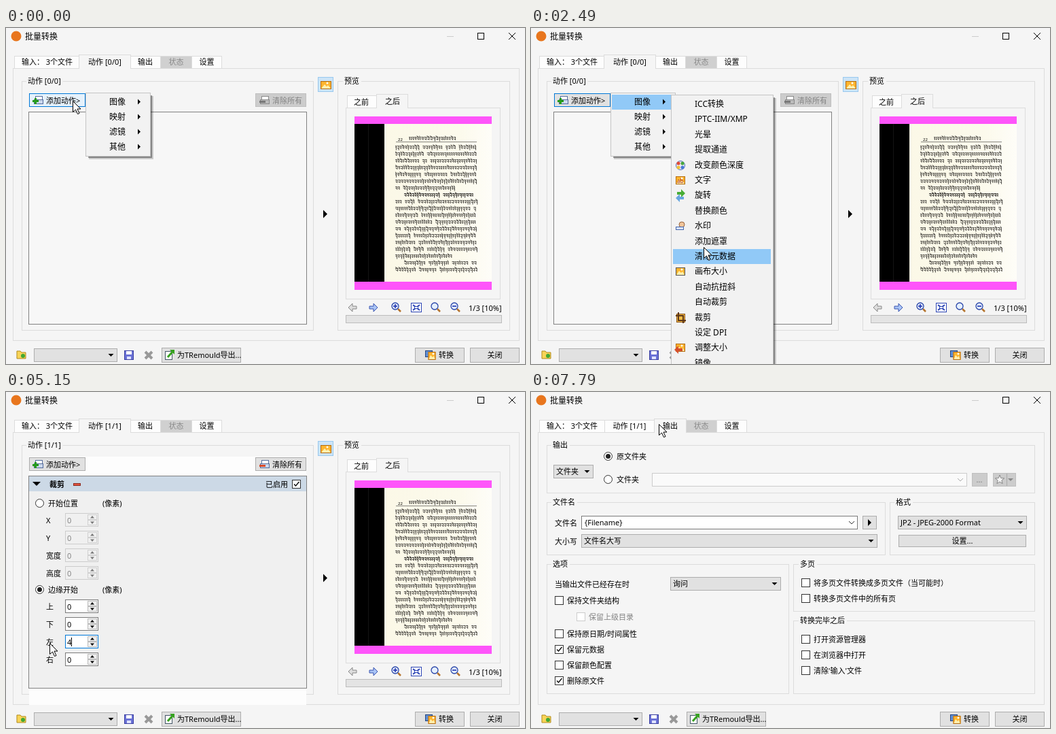
These frames come from a looping animation (764 by 494 pixels, 8 s). An HTML page with a canvas:

```html
<!DOCTYPE html>
<html lang="zh-CN">
<head>
<meta charset="utf-8">
<title>批量转换</title>
<style>
html, body { margin: 0; width: 100%; height: 100%; overflow: hidden; background: #f5f5f5; }
canvas { display: block; }
</style>
</head>
<body>
<canvas id="stage" width="764" height="494"></canvas>
<script>
const g = document.getElementById('stage').getContext('2d');
const LOOP = 8000, BG = '#f5f5f5', BLUE = '#0078d7', FACE = '#e1e1e1', EDGE = '#adadad';
const FONT = '"Noto Sans", "Noto Sans CJK SC", "Noto Sans CJK JP", sans-serif';

// Pointer stops: time, x, y
const STOPS = [
  [0, 98, 107], [1200, 135, 103], [1320, 152, 106], [1450, 174, 110], [1580, 188, 112],
  [1710, 200, 112], [1840, 232, 122], [1980, 264, 147], [2100, 263, 180], [2250, 260, 238],
  [2390, 254, 322], [2520, 247, 384], [2660, 243, 416], [2790, 241, 422], [3040, 241, 396],
  [3190, 232, 372], [3340, 216, 356], [3480, 192, 342], [3610, 166, 333], [3750, 140, 331],
  [3890, 122, 338], [4030, 110, 350], [4160, 104, 360], [4300, 100, 364], [4420, 92, 366],
  [4580, 76, 368], [4730, 64, 369], [6760, 72, 342], [6880, 90, 262], [7010, 122, 140],
  [7140, 160, 40], [7270, 183, 18], [7400, 188, 47]
];
const MENU = ['图像', '映射', '滤镜', '其他'];
const ITEMS = ['ICC转换', 'IPTC-IIM/XMP', '光晕', '提取通道', '改变颜色深度', '文字', '旋转', '替换颜色', '水印',
  '添加遮罩', '清除元数据', '画布大小', '自动抗扭斜', '自动裁剪', '裁剪', '设定 DPI', '调整大小', '镜像'];

function text(s, x, cy, { size = 11, color = '#000', align = 'left', bold = false } = {}) {
  g.font = (bold ? 'bold ' : '') + size + 'px ' + FONT;
  g.textAlign = align;
  g.fillStyle = color;
  g.fillText(s, x, cy + 4);
}
function fill(x, y, x2, y2, color) {
  g.fillStyle = color;
  g.fillRect(x, y, x2 - x, y2 - y);
}
function box(x, y, x2, y2, color, edge = EDGE) {
  if (color) fill(x, y, x2, y2, color);
  g.strokeStyle = edge;
  g.lineWidth = 1;
  g.strokeRect(x + .5, y + .5, x2 - x - 1, y2 - y - 1);
}
function line(pts, color = '#000', width = 1) {
  g.beginPath();
  for (let i = 0; i < pts.length; i += 2) g.lineTo(pts[i], pts[i + 1]);
  g.strokeStyle = color;
  g.lineWidth = width;
  g.stroke();
}
function poly(pts, color, edge) {
  g.beginPath();
  for (let i = 0; i < pts.length; i += 2) g.lineTo(pts[i], pts[i + 1]);
  g.closePath();
  g.fillStyle = color;
  g.fill();
  if (edge) { g.strokeStyle = edge; g.lineWidth = 1; g.stroke(); }
}
function disc(x, y, r, color, edge, width = 1) {
  g.beginPath();
  g.arc(x, y, r, 0, 7);
  if (color) { g.fillStyle = color; g.fill(); }
  if (edge) { g.strokeStyle = edge; g.lineWidth = width; g.stroke(); }
}
const right = (x, y, h = 4) => poly([x, y - h, x + h, y, x, y + h], '#000');
const down = (x, y, w = 4, color = '#000') => poly([x - w, y - w / 2, x + w, y - w / 2, x, y + w / 2], color);

function group(x, y, x2, y2, label, lx) {
  box(x, y, x2, y2, null, '#dcdcdc');
  g.font = '11px ' + FONT;
  fill(lx - 2, y - 1, lx + g.measureText(label).width + 3, y + 2, BG);
  text(label, lx, y);
}
function combo(x, y, x2, label) {
  box(x, y, x2, y + 20, FACE);
  text(label, x + 4, y + 10);
  down(x2 - 9.5, y + 10);
}
function check(x, cy, label, { on, off } = {}) {
  box(x, cy - 7, x + 13, cy + 6, '#fff', off ? '#ccc' : '#333');
  if (on) line([x + 3, cy - .5, x + 5.5, cy + 2, x + 10.5, cy - 4], '#000', 1.3);
  text(label, x + 18, cy, { color: off ? '#838383' : '#000' });
}
function radio(x, y, on) {
  disc(x, y, 6, '#fff', '#333');
  if (on) disc(x, y, 3.5, '#222');
}

// Small icons, each centred on x, y
function picture(x, y, w = 14) {
  box(x - w / 2, y - 6, x + w / 2, y + 6, '#ffb52e', '#b36b12');
  poly([x - w / 2 + 1, y + 5, x - 2, y - 1, x + 1, y + 2, x + 3, y, x + w / 2 - 1, y + 5], '#fff0b0');
  disc(x + 2, y - 3, 1.5, '#fff');
}
function printer(x, y, mark, grey) {
  box(x - 4, y - 7, x + 7, y - 1, '#fff', grey ? '#888' : '#536b9b');
  box(x - 6, y - 2, x + 8, y + 5, grey ? '#bbb' : '#cbd8ee', grey ? '#888' : '#536b9b');
  if (mark === '+') {
    fill(x - 8, y - 1, x + 1, y + 2, '#279c1a');
    fill(x - 5, y - 4, x - 2, y + 5, '#279c1a');
  } else fill(x - 7, y, x + 2, y + 3, grey ? '#777' : '#d84a28');
}
function arrowIcon(x, y, dir, color, edge) {
  poly([x - 6, y - 2, x, y - 2, x, y - 6, x + 6, y, x, y + 6, x, y + 2, x - 6, y + 2]
    .map((v, i) => i % 2 ? v : x + (v - x) * dir), color, edge);
}
function lens(x, y, sign) {
  line([x + 3, y + 3, x + 7, y + 7], '#b5742d', 2.5);
  disc(x - 1, y - 1, 5, '#e4efff', '#2945a8', 1.3);
  if (sign) line([x - 4, y - 1, x + 2, y - 1], '#2034b0', 1.6);
  if (sign === '+') line([x - 1, y - 4, x - 1, y + 2], '#2034b0', 1.6);
}
function fitIcon(x, y) {
  box(x - 8, y - 7, x + 8, y + 7, '#fff', '#2c45b5');
  line([x - 5, y - 4, x + 5, y + 4], '#2c45b5', 2);
  line([x + 5, y - 4, x - 5, y + 4], '#2c45b5', 2);
  box(x - 3, y - 2, x + 3, y + 2, '#fff', '#2c45b5');
}
function folder(x, y) {
  poly([x - 7, y - 5, x - 2, y - 5, x, y - 3, x + 6, y - 3, x + 6, y + 6, x - 7, y + 6], '#f8d458', '#b08a1d');
  disc(x + 2, y + 2, 3, '#42a833');
}

function tab(x, x2, label, state) {
  const on = state === 'on';
  const color = { on: BG, off: '#d0d0d0', hot: '#d8eafa' }[state] || '#fdfdfd';
  const y = on ? 39 : 41;
  box(x, y, x2, 60, color, '#dcdcdc');
  if (on) fill(x + 1, 58, x2 - 1, 61, BG);
  text(label, (x + x2) / 2, 50, { align: 'center', color: state === 'off' ? '#8a8a8a' : '#000' });
}
function frame(t) {
  fill(0, 0, 764, 494, BG);
  disc(15, 12, 7.5, '#e8761e');
  text('批量转换', 28, 13, { size: 12 });
  line([649, 12.5, 659, 12.5], '#ccc');
  box(694, 7, 704, 17, null, '#000');
  line([740, 7, 750, 17]);
  line([750, 7, 740, 17]);
  box(10, 59, 756, 460, BG, '#dcdcdc');
  const out = t >= 7670, count = t >= 2900 ? '1/1' : '0/0';
  tab(12, 109, '输入： 3个文件');
  tab(227, 274, '状态', 'off');
  tab(273, 318, '设置');
  if (out) {
    tab(108, 182, `动作 [${count}]`);
    tab(181, 229, '输出', 'on');
  } else {
    tab(182, 228, '输出', t >= 7400 && 'hot');
    tab(107, 184, `动作 [${count}]`, 'on');
  }
}
function footer() {
  folder(23, 480);
  combo(41, 471, 164, '');
  box(174, 474, 188, 488, '#6b72d6', '#3a3fa0');
  fill(177, 475, 185, 480, '#fff');
  fill(178, 483, 184, 487, '#dfe3ff');
  line([205, 476, 215, 486], '#999', 4);
  line([215, 476, 205, 486], '#999', 4);
  box(229, 470, 346, 492, FACE);
  box(234, 475, 245, 488, '#fff', '#456');
  line([238, 484, 246, 475], '#36a21f', 3);
  poly([241, 473, 248, 473, 248, 480], '#36a21f');
  text('为TRemould导出...', 252, 481);
  box(602, 470, 675, 492, FACE);
  box(617, 474, 628, 484, '#5e8ed6', '#27477f');
  picture(627, 482, 11);
  text('转换', 637, 481);
  box(683, 470, 756, 492, FACE);
  text('关闭', 719.5, 481, { align: 'center' });
}

// Scanned page of a headline-hung script, made of seeded strokes
function script(x, y, end, rnd, bold) {
  g.beginPath();
  while (x < end - 2) {
    const w = 1.8 + rnd() * 2, low = rnd() < .3 ? 3.6 : 1.8;
    g.moveTo(x, y - 2.5);
    g.lineTo(x + w, y - 2.5);
    g.moveTo(x + w - .4, y - 2.5);
    g.lineTo(x + w - .4, y + low);
    g.moveTo(x + .3, y - 1 + rnd());
    g.lineTo(x + w - .4, y + rnd() * 1.8);
    if (rnd() < .32) { g.moveTo(x, y - 4.3); g.lineTo(x + w * .8, y - 3.3); }
    x += w + (rnd() < .04 ? 5 : .7);
  }
  g.lineWidth = bold ? 1 : .8;
  g.stroke();
}
function scan(x, y, x2, y2) {
  const scale = (y2 - y) / 232;
  const paper = g.createLinearGradient(x, 0, x2, 0);
  paper.addColorStop(0, '#fbf8e7');
  paper.addColorStop(.7, '#fcfaec');
  paper.addColorStop(1, '#fefdf8');
  fill(x, y, x2, y2, paper);
  let seed = 22;
  const rnd = () => (seed = seed * 16807 % 2147483647) / 2147483647;
  g.save();
  g.translate(x, y);
  g.scale(scale, scale);
  text('22', 20, 21, { size: 6 });
  g.strokeStyle = '#2b2926';
  script(36, 22, 105, rnd);
  line([17, 26.5, 136, 26.5], '#555', .7);
  g.strokeStyle = '#2b2926';
  const ends = { 6: 106, 16: 101, 18: 137 };
  for (let i = 0; i < 19; i++) script(i === 7 || i === 17 ? 29 : 16, 35 + i * 10, ends[i] || 136, rnd, i === 7);
  g.restore();
}
function preview(t) {
  const cropped = t >= 6360;
  box(459, 72, 482, 94, '#cce4f7', '#99c9ef');
  picture(471, 84, 16);
  right(467, 273.5, 6);
  group(488, 78, 742, 445, '预览', 498);
  box(500, 117, 728, 399, BG, '#dcdcdc');
  box(502, 99, 546, 118, '#fdfdfd', '#dcdcdc');
  text('之前', 523, 109, { align: 'center' });
  box(545, 97, 592, 118, BG, '#dcdcdc');
  fill(546, 116, 591, 119, BG);
  text('之后', 569, 108, { align: 'center' });
  fill(513, 130, 715, 385, '#fe55fa');
  if (cropped) scan(528, 130, 700, 385);
  else {
    fill(513, 141, 557, 373, '#000');
    line([533.5, 141, 533.5, 373], '#141414');
    scan(557, 141, 715, 373);
  }
  arrowIcon(510, 411, -1, '#ddd', '#888');
  arrowIcon(541, 411, 1, '#a9c4f5', '#3a55b0');
  lens(574, 410, '+');
  fitIcon(604, 411);
  lens(632, 410);
  lens(661, 410, '-');
  text(`1/3 [${cropped ? 11 : 10}%]`, 681, 412);
  box(500, 422, 730, 434, '#e4e4e4', '#bcbcbc');
}

function spin(y, value, { off, focus, selected, caret } = {}) {
  box(87, y - 10, 136, y + 10, off ? '#f0f0f0' : '#fff', focus ? BLUE : off ? '#ccc' : '#7a7a7a');
  if (selected) fill(90, y - 6, 97, y + 7, BLUE);
  text(value, 90, y + 1, { color: selected ? '#fff' : off ? '#838383' : '#000' });
  if (caret) {
    const x = Math.round(90 + g.measureText(value).width);
    fill(x, y - 6, x + 1, y + 7, '#000');
  }
  for (const d of [-1, 1]) {
    box(120, y - (d < 0 ? 8 : 0), 134, y + (d < 0 ? 0 : 8), '#f0f0f0', off ? '#d0d0d0' : '#bbb');
    poly([124, y + d * 2.5, 130, y + d * 2.5, 127, y + d * 6], off ? '#777' : '#000');
  }
}
function cropPanel(t) {
  fill(34, 124, 442, 435, '#f0f0f0');
  fill(34, 124, 442, 146, '#ccd9e6');
  down(45, 135, 6);
  text('裁剪', 64, 136, { bold: true });
  box(99, 134, 110, 138, '#e0533f', '#8e2b20');
  text('已启用', 382, 136);
  check(421, 136, '', { on: true });
  radio(49.5, 163.5);
  radio(49.5, 290.5, true);
  ['开始位置', '边缘开始'].forEach((s, i) => {
    text(s, 62, 164 + i * 127);
    text('(像素)', 142, 164 + i * 127);
  });
  ['X', 'Y', '宽度', '高度'].forEach((s, i) => {
    text(s, 59, 189 + i * 26);
    spin(188 + i * 26, '0', { off: true });
  });
  const left = t < 5010 ? '0' : t < 5430 ? '4' : t < 5830 ? '44' : '440';
  ['上', '下', '左', '右'].forEach((s, i) => {
    const y = 315 + i * 26, here = i === 2 && t >= 4420;
    text(s, 59, y + 1);
    spin(y, i === 2 ? left : '0', {
      focus: here, selected: here && t >= 4580 && t < 5010, caret: here && t >= 5150 && t < 6360
    });
  });
}
function actions(t) {
  const added = t >= 2900;
  group(23, 78, 453, 445, `动作 [${added ? '1/1' : '0/0'}]`, 32);
  if (added) fill(34, 95, 442, 460, '#fdfdfd');
  const face = t < 660 ? '#e5f1fb' : t < 930 ? '#cce4f7' : FACE;
  box(34, 96, 117, 116, face, added ? EDGE : BLUE);
  printer(47, 107, '+');
  text('添加动作>', 59, 107);
  box(367, 96, 442, 116, added ? FACE : '#ccc', added ? EDGE : '#bfbfbf');
  printer(380, 107, '-', !added);
  text('清除所有', 392, 107, { color: added ? '#000' : '#838383' });
  box(33, 123, 443, 436, '#f7f7f7', '#828282');
  if (added) cropPanel(t);
  preview(t);
}

function popup(x, y, x2, y2) {
  fill(x + 5, y + 5, x2 + 4, y2 + 4, 'rgba(0,0,0,.18)');
  fill(x + 4, y + 4, x2 + 2, y2 + 2, 'rgba(0,0,0,.35)');
  box(x, y, x2, y2, '#f2f2f2', '#c4c4c4');
}
function itemIcon(i, y) {
  const x = 220;
  if (i === 4) {
    disc(x, y, 6.5, '#e8e8f4', '#5470b8');
    ['#e24b37', '#48a83d', '#f2c334', '#4779d8'].forEach((c, k) =>
      disc(x + (k % 2 ? 3 : -3), y + (k > 1 ? 3 : -3), 2.5, c));
  } else if (i === 6) {
    arrowIcon(x + 1, y - 3, 1, '#48ad35');
    arrowIcon(x - 1, y + 4, -1, '#67a6df');
  } else if (i === 8) {
    disc(x + 2, y - 2, 4, '#f0c49a', '#96633c');
    box(x - 7, y + 1, x + 5, y + 6, '#d9e5fb', '#4868ad');
  } else if (i === 14) {
    box(x - 6, y - 6, x + 7, y + 7, '#f5bd47', '#8b5318');
    line([x - 3, y - 8, x - 3, y + 4, x + 8, y + 4], '#5b3517', 2);
    line([x - 7, y - 3, x + 4, y - 3, x + 4, y + 8], '#5b3517', 2);
  } else {
    picture(x, y);
    if (i === 5) text('ab', x - 5, y, { size: 8, color: '#a02020' });
    if (i === 11) box(x - 7, y - 6, x + 7, y + 6, null, '#555');
    if (i === 16) arrowIcon(x - 3, y + 3, -1, '#d7502c');
  }
}
function menus(t, px, py) {
  if (t >= 2900 || t >= 660 && t < 930) return;
  popup(117, 95, 213, 189);
  if (t >= 1320) fill(119, 98, 211, 120, '#91c9f7');
  MENU.forEach((s, i) => {
    text(s, 152, 109 + i * 22, { size: 12 });
    right(194, 108.5 + i * 22);
  });
  if (t < 1710) return;
  popup(206, 98, 357, 520);
  const hot = px > 207 ? Math.round((py + 9 - 112) / 22.4) : -1;
  ITEMS.forEach((s, i) => {
    const y = Math.round(112 + i * 22.4);
    if (i === hot) fill(209, y - 11, 353, y + 11, '#91c9f7');
    text(s, 241, y, { size: 12 });
    if ([4, 5, 6, 8, 11, 14, 16].includes(i)) itemIcon(i, y);
  });
}

function output() {
  group(23, 78, 742, 149, '输出', 32);
  combo(33, 107, 92, '文件夹');
  radio(113.5, 94.5, true);
  text('原文件夹', 126, 95);
  radio(113.5, 128.5);
  text('文件夹', 126, 129);
  box(178, 119, 642, 139, '#fafafa', '#ccc');
  line([628, 127, 632, 131, 636, 127], '#aaa');
  box(649, 119, 672, 139, '#ccc', '#bfbfbf');
  text('...', 660, 129, { align: 'center', color: '#777' });
  box(680, 119, 714, 139, '#ccc', '#bfbfbf');
  const star = [];
  for (let i = 0; i < 10; i++) {
    const r = i % 2 ? 3 : 7, a = i * Math.PI / 5;
    star.push(690 + r * Math.sin(a), 129 - r * Math.cos(a));
  }
  poly(star, '#f4f4f4', '#888');
  line([700.5, 120, 700.5, 138], '#aaa');
  down(706, 129, 4, '#888');

  group(23, 162, 522, 240, '文件名', 32);
  text('文件名', 35, 193);
  box(74, 182, 481, 202, '#fff', '#7a7a7a');
  text('{Filename}', 79, 192);
  line([468, 190, 472, 194, 476, 190], '#333');
  box(488, 182, 509, 202, FACE);
  right(496, 192, 5);
  text('大小写', 35, 220);
  combo(74, 209, 510, '文件名大写');

  group(528, 162, 742, 240, '格式', 537);
  combo(540, 182, 730, 'JP2 - JPEG-2000 Format');
  box(541, 210, 729, 228, FACE);
  text('设置...', 635, 219, { align: 'center' });

  group(23, 253, 380, 444, '选项', 32);
  text('当输出文件已经存在时', 35, 283);
  combo(205, 272, 368, '询问');
  check(35, 307, '保持文件夹结构');
  check(67, 331, '保留上级目录', { off: true });
  check(35, 356, '保持原日期/时间属性');
  check(35, 379, '保留元数据', { on: true });
  check(35, 402, '保留颜色配置');
  check(35, 425, '删除原文件', { on: true });

  group(386, 253, 742, 323, '多页', 396);
  check(398, 281, '将多页文件转换成多页文件（当可能时）');
  check(398, 304, '转换多页文件中的所有页');
  group(386, 336, 742, 444, '转换完毕之后', 396);
  check(398, 364, '打开资源管理器');
  check(398, 387, '在浏览器中打开');
  check(398, 410, "清除'输入'文件");
}

function pointer(x, y) {
  const shape = [0, 0, 0, 16, 4, 12.5, 7, 19, 9.5, 18, 6.5, 11.5, 11.5, 11.5];
  poly(shape.map((v, i) => v + .5 + (i % 2 ? y : x)), '#fff', '#000');
}

function draw(now) {
  const t = now % LOOP;
  const [, x, y] = STOPS.findLast(s => s[0] <= t);
  frame(t);
  footer();
  if (t < 7670) actions(t);
  else output();
  menus(t, x, y);
  pointer(x, y);
}
const start = performance.now();
function tick() {
  draw(performance.now() - start);
  requestAnimationFrame(tick);
}
tick();
</script>
</body>
</html>
```
